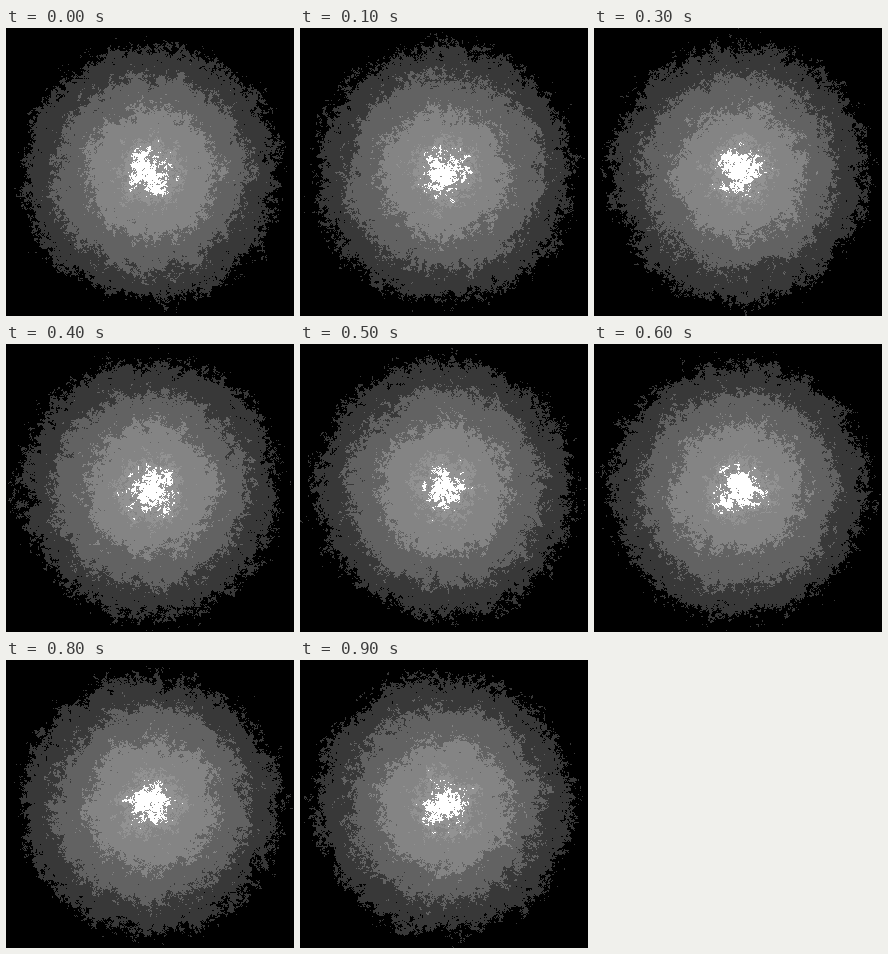
Recreate the animation shown at these times as an HTML page with a canvas. Size 288 by 288 pixels, loop 1 s.

```html
<!DOCTYPE html>
<html lang="en">
<head>
<meta charset="utf-8">
<title>Flickering glow</title>
<style>
  html, body { margin: 0; height: 100%; overflow: hidden; background: #000; }
  canvas { display: block; width: 100vw; height: 100vh; image-rendering: pixelated; }
</style>
</head>
<body>
<canvas id="glow" width="288" height="288"></canvas>
<script>
const SIZE = 288, CENTER = 144.5, FRAMES = 10, STEP = 100;
const ctx = document.getElementById('glow').getContext('2d');

// Rings from the core outwards: [radius, grey level]
const rings = [[16, 255], [31, 146], [65, 132], [97, 98], [126, 56]];
// Noise octaves: [cell size, amplitude in pixels]
const octaves = [[16, 5], [8, 6], [4, 8], [2, 8], [1, 5]];

// Repeatable random value from -1 to 1 for a lattice point
function hash(x, y, seed) {
  let h = Math.imul(x, 374761393) ^ Math.imul(y, 668265263) ^ Math.imul(seed, 1274126177);
  h = Math.imul(h ^ (h >>> 15), 2246822519);
  h = Math.imul(h ^ (h >>> 13), 3266489917);
  return ((h ^ (h >>> 16)) >>> 0) / 2147483648 - 1;
}

const mix = (a, b, t) => a + (b - a) * t;

function valueNoise(x, y, seed) {
  const i = Math.floor(x), j = Math.floor(y), u = x - i, v = y - j;
  return mix(
    mix(hash(i, j, seed), hash(i + 1, j, seed), u),
    mix(hash(i, j + 1, seed), hash(i + 1, j + 1, seed), u), v);
}

function roughness(x, y, seed) {
  let sum = 0;
  octaves.forEach(([cell, amp], k) => {
    sum += amp * valueNoise(x / cell, y / cell, seed * 8 + k + 1);
  });
  return sum;
}

function render(seed) {
  const img = ctx.createImageData(SIZE, SIZE);
  for (let y = 0, p = 0; y < SIZE; y++) {
    for (let x = 0; x < SIZE; x++, p += 4) {
      const r = Math.hypot(x - CENTER, y - CENTER);
      let grey = 0;
      if (r < 158) {
        const d = r + roughness(x, y, seed);
        const ring = rings.find(([radius]) => d < radius);
        if (ring) grey = ring[1];
      }
      img.data[p] = img.data[p + 1] = img.data[p + 2] = grey;
      img.data[p + 3] = 255;
    }
  }
  return img;
}

const frames = Array.from({ length: FRAMES }, (_, i) => render(i + 1));
const start = performance.now();

function draw() {
  const t = performance.now() - start;
  ctx.putImageData(frames[Math.floor(t / STEP) % FRAMES], 0, 0);
  requestAnimationFrame(draw);
}
draw();
</script>
</body>
</html>
```
